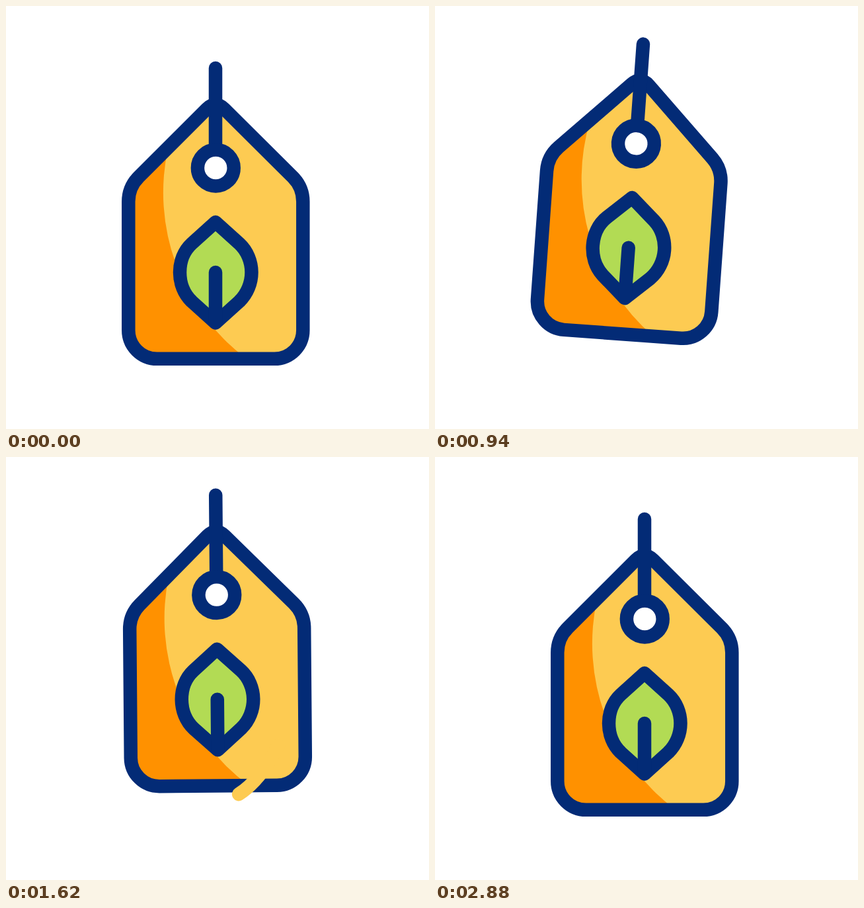
Animation, 640 px wide and 640 px high, one loop 3020 ms. Source, as an HTML page:

```html
<!DOCTYPE html>
<html lang="en">
<head>
<meta charset="utf-8">
<title>Swinging eco tag</title>
<style>
  html, body { margin: 0; height: 100%; overflow: hidden; background: #fff; }
  svg { display: block; width: 100vw; height: 100vh; }
  .line { fill: none; stroke: #032b76; }
  .swoosh { fill: none; stroke: #fdcb52; }
</style>
</head>
<body>
<svg viewBox="0 0 640 640" stroke-width="20.5" stroke-linecap="round" stroke-linejoin="round">
  <defs>
    <path id="body" d="M185.3 296A52.6 52.6 0 0 1 200.7 258.8L304 155.5Q317 142.5 330 155.5L433.9 258.8A52.6 52.6 0 0 1 449.3 296V490.6A43.2 43.2 0 0 1 406.1 533.8H228.5A43.2 43.2 0 0 1 185.3 490.6Z"/>
  </defs>
  <g id="tag">
    <use href="#body" fill="#fdcb52"/>
    <path fill="#ff9100" d="M245.4 214A314 314 0 0 0 364 533.8H228.5A43.2 43.2 0 0 1 185.3 490.6V296A52.6 52.6 0 0 1 200.7 258.8Z"/>
    <use href="#body" class="line"/>
    <path class="line" style="fill:#b2db54" d="M317 327L281 359.5C269 370.5 263 387 263 403S269 435.5 281 447L317 479.5L353 447C365 435.5 371.5 419 371.5 403S365 370.5 353 359.5Z"/>
    <path class="line" d="M317 403V479M317 94V215"/>
    <circle class="line" style="fill:#fff" cx="317.3" cy="245" r="27.4"/>
    <path class="swoosh" data-start="2230" data-lag="233" pathLength="1" d="M317 403V479"/>
  </g>
  <path class="swoosh" data-start="280" data-lag="233" pathLength="1" d="M439.5 447.5A140 140 0 0 1 159.5 447.5"/>
  <path class="swoosh" data-start="966" data-lag="380" pathLength="1" d="M146 416C166 473 214 529 282 529C342 529 380 500 412 436"/>
</svg>
<script>
const LOOP = 3020;
const ANGLE = [[180, 0], [740, 8], [1350, -7.2], [1885, 6], [2520, 0]];
const LIFT = [[180, 0], [862, -36.3], [1735, -36.3], [2550, 0]];
const tag = document.getElementById('tag');
const swooshes = document.querySelectorAll('.swoosh');

function ease(t, from, duration) {
  const u = Math.min(1, Math.max(0, (t - from) / duration));
  return u * u * (3 - 2 * u);
}

// Sum of eased steps between [time, value] keys.
function track(keys, t) {
  return keys.slice(1).reduce((value, [time, next], i) => {
    const [from, previous] = keys[i];
    return value + (next - previous) * ease(t, from, time - from);
  }, keys[0][1]);
}

// The stroke grows from its start, then its tail follows after a lag.
function drawSwoosh(path, t) {
  const age = t - path.dataset.start;
  const head = ease(age, 0, 495);
  const tail = ease(age, path.dataset.lag, 417);
  path.style.display = head > tail ? '' : 'none';
  path.setAttribute('stroke-dasharray', `${head - tail} 3`);
  path.setAttribute('stroke-dashoffset', -tail);
}

function frame() {
  const t = performance.now() % LOOP;
  tag.setAttribute('transform',
    `translate(0 ${track(LIFT, t)}) rotate(${track(ANGLE, t)} 317 66)`);
  swooshes.forEach(path => drawSwoosh(path, t));
  requestAnimationFrame(frame);
}
frame();
</script>
</body>
</html>
```
